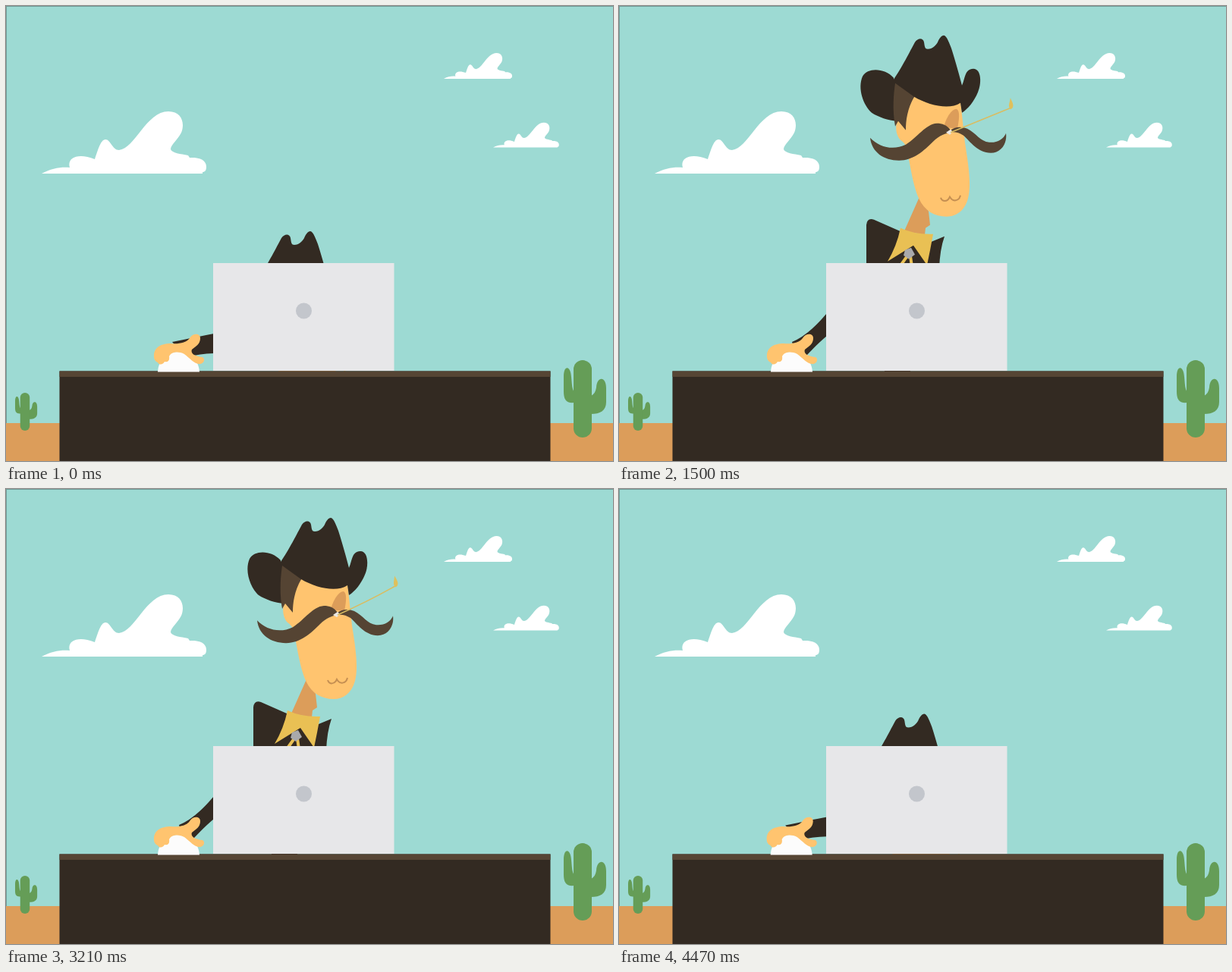
An HTML page for the animation above (4500 ms loop, 800x600 px).

```html
<!DOCTYPE html>
<html lang="en">
<head>
<meta charset="utf-8">
<title>Cowboy at the desk</title>
<style>
  html, body { margin: 0; width: 100%; height: 100%; overflow: hidden; background: #9ddad3; }
  svg { display: block; width: 100vw; height: 100vh; }
  .dark { fill: #332a22; }
  .brown { fill: #554433; }
  .skin { fill: #ffc46f; }
  .tan { fill: #dc9d5a; }
  .gold { fill: #e9c054; }
</style>
</head>
<body>
<svg viewBox="0 0 800 600">
  <defs>
    <path id="cloud" fill="#fff" d="M47 221C60 214 72 212 84 213C80 200 95 193 117 202C121 190 125 176 131 176C138 176 140 190 149 190C170 188 185 139 214 139C232 139 236 155 231 167C226 177 217 183 217 189C219 194 230 195 240 197L242 200C258 199 264 205 264 212C264 217 262 219 259 219V221Z"/>
    <g id="cactus" fill="#659d57">
      <rect x="748" y="467" width="24" height="102" rx="12"/>
      <path d="M735 489C735 473 744 474 745 489C746 500 746 505 749 509V523C738 524 735 519 735 508Z"/>
      <path d="M791 504C791 488 779 488 778 503C777 509 775 512 771 514V538C783 538 791 534 791 522Z"/>
    </g>
  </defs>

  <rect width="800" height="600" fill="#9ddad3"/>
  <path d="M0 .5H800M.5 0V550" stroke="#6f9a95" fill="none"/>
  <rect class="tan" y="550" width="800" height="50"/>
  <use href="#cloud"/>
  <use href="#cloud" transform="translate(577 96) scale(.415) translate(-47 -221)"/>
  <use href="#cloud" transform="translate(642 186.5) scale(.4) translate(-47 -221)"/>
  <use href="#cactus"/>
  <use href="#cactus" transform="translate(12 510) scale(.52 .49) translate(-735 -467)"/>

  <g id="man">
    <path class="dark" d="M326 420V288Q327 278 336 281L370 296L412 310L429 303Q423 320 422 345V420H384V490H350V420Z"/>
    <path class="tan" d="M396 251L376 296L403 301L404 292L410 288L408 270Z"/>
    <path d="M380 329L370 343M384 329L386 343" stroke="#e9c054" stroke-width="4"/>
    <path class="gold" d="M371 292Q390 301 414 300Q410 322 406 341L388 315L354 336Q366 316 371 292Z"/>
    <path fill="#a9a9ab" d="M377 321L385 318L390 327L382 333L375 328Z"/>
    <path class="skin" d="M386 114L450 124L456 180C460 205 464 230 461 248C458 268 445 277 432 277C412 277 398 266 391 242C386 226 383 205 380 191C379 184 376 179 371 176C365 170 363 156 368 149Z"/>
    <path class="tan" d="M428 159C431 147 438 135 445 135C450 138 448 150 446 161Z"/>
    <path d="M424 252C426 258 433 258 436 251C440 258 448 257 450 249" fill="none" stroke="#c58f52" stroke-width="2"/>
    <path class="dark" d="M362 96C372 82 384 58 390 47C394 41 401 41 402 47C403 53 403 56 407 56C413 56 418 51 420 47C422 42 425 38 428 38C432 38 436 50 438 55C444 74 449 92 452 104C456 97 455 82 467 82C478 82 478 102 473 113C468 125 460 135 452 140L450 127C435 137 408 130 389 119L366 151C355 150 342 146 333 140C322 130 314 108 321 92C328 80 350 81 362 94Z"/>
    <path class="brown" d="M364 101L389 119C380 135 378 150 378 163L368 151L364 158C360 135 362 115 364 101Z"/>
    <path class="brown" id="left" d="M437 163C432 156 426 154 419 154C404 155 394 172 378 182C362 190 343 186 331 173C333 192 349 203 369 203C388 203 402 190 414 178C422 170 430 167 437 166Z"/>
    <path class="brown" id="right" d="M437 163C443 158 452 158 459 161C471 167 476 178 488 179C498 180 507 175 510 167C512 181 503 193 490 193C473 193 463 178 454 170C448 166 442 165 437 166Z"/>
    <path fill="#ece9e4" d="M431 166L437 162L440 165L436 169Z"/>
    <g id="pick">
      <path id="stalk" fill="none" stroke="#d9bd62" stroke-width="1.5"/>
      <path fill="#dfc05c" d="M513 128C508 124 511 120 511 113C514 118 517 122 515 126Z"/>
    </g>
  </g>

  <rect class="dark" x="70.5" y="481.5" width="647" height="119"/>
  <rect x="70.5" y="481.5" width="647" height="7.5" fill="#564534"/>
  <path class="dark" id="arm"/>
  <g id="hand">
    <path fill="#fcfcfc" d="M200 482.5C201 466 212 456 228 456C244 456 254 468 255 482.5Z"/>
    <path class="skin" d="M195 463C194 450 205 445 217 445C228 446 238 444 242 438C246 431 256 431 256 438C256 446 250 449 245 453C243 458 248 462 259 463C263 465 261 472 255 472C248 472 242 464 235 459C227 455 218 456 215 462C216 468 213 470 209 469C207 473 202 474 200 470C197 469 195 466 195 463Z"/>
  </g>
  <rect x="273" y="339" width="238.5" height="142" fill="#e7e7e9"/>
  <circle cx="392.5" cy="402" r="10.5" fill="#c3c6cc"/>
</svg>
<script>
const LOOP = 4500, STEP = 30;
const RISE = 1080, FALL = 3283, DEPTH = 249;
const { abs, cos, sin, exp, min, max, PI } = Math;
const $ = id => document.getElementById(id);
const set = (id, name, value) => $(id).setAttribute(name, value);
const turn = (id, angle) => set(id, 'transform', `rotate(${angle} 437 166)`);

// Damped spring let go at s = 0: runs from 1 to rest at 0.
function spring(s, damping, speed) {
  if (s <= 0) return 1;
  return exp(-damping * s) * (cos(speed * s) + damping / speed * sin(speed * s));
}

function smooth(from, to, v) {
  const u = min(1, max(0, (v - from) / (to - from)));
  return u * u * (3 - 2 * u);
}

const burst = s => exp(-((s / 160) ** 2));

function draw(t) {
  // Sneaking behind the lid, centred on the seam of the loop.
  const seam = t > LOOP / 2 ? t - LOOP : t;
  const sneak = smooth(720, 480, abs(seam));
  const duck = sneak * (1 + cos(seam * 2 * PI / 480)) / 2;

  const depth = t < FALL
    ? spring(t - RISE, .014, .015)
    : 1 - spring(t - FALL, .011, .008);
  const x = 7 * sneak - 34 * duck;
  const y = DEPTH * depth + 10 * duck;
  set('man', 'transform', `translate(${x} ${y})`);

  // Two bouts of chewing wiggle the straw; the second moves the moustache too.
  let angle = t < FALL ? 85 * spring(t - 1010, .005, .012) : 85 * smooth(-660, -420, seam);
  let bend = 0;
  for (const mid of [1900, 2960]) {
    const s = t - mid;
    angle += 20 * burst(s) * cos(s / 35);
    bend += 16 * burst(s) * sin(s / 35);
  }
  const twitch = 5 * burst(t - 2960) * cos((t - 2960) / 35) ** 2;
  turn('pick', angle);
  turn('left', -twitch);
  turn('right', twitch);
  set('stalk', 'd', `M437 166Q${475 + bend} ${146 + bend * 1.8} 513 126`);

  // The sleeve swings up as the shoulder rises; the hand nudges the mouse.
  const lift = 1 - depth, nudge = -8 * (sneak - duck);
  const top = 442 - 37 * lift - 10 * duck;
  const low = 466 - 31 * lift - 8 * duck;
  const cuff = 453 - 10 * min(1, 2 * max(0, lift) + duck);
  set('hand', 'transform', `translate(${nudge} 0)`);
  set('arm', 'd', `M${232 - 4 * lift - 13 * duck + nudge} ${cuff}` +
    `Q${250 - 12 * duck + nudge} ${449 - 15 * lift - 10 * duck} 274 ${top}V${low}` +
    `Q262 ${467 - 22 * lift - 9 * duck} ${247 + nudge} 461L${232 + nudge} 457Z`);
}

const start = performance.now();
function tick() {
  const t = (performance.now() - start) % LOOP;
  draw(Math.floor(t / STEP) * STEP);
  requestAnimationFrame(tick);
}
tick();
</script>
</body>
</html>
```
